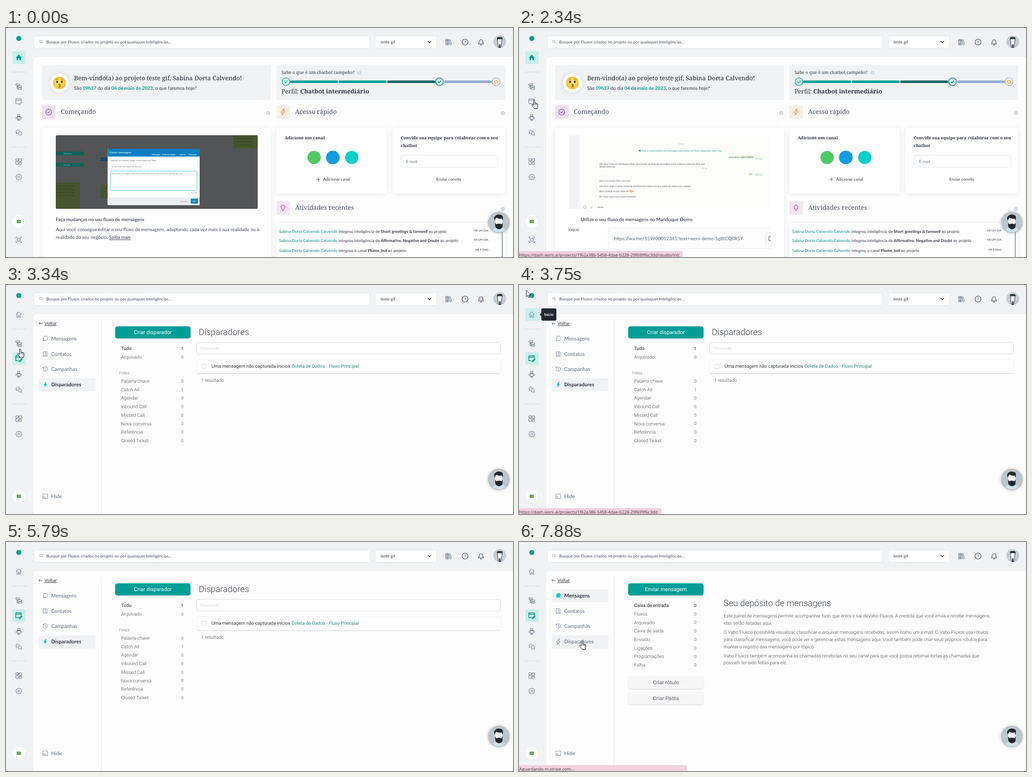
An HTML page with a canvas for the animation above (8 s loop, 1110 px wide and 504 px high).

```html
<!DOCTYPE html>
<html lang="pt-BR">
<head>
<meta charset="utf-8">
<title>Painel do projeto</title>
<style>
html, body { margin: 0; width: 100%; height: 100%; overflow: hidden; background: #f0f2f3; }
canvas { display: block; width: 1110px; height: 504px; }
</style>
</head>
<body>
<canvas id="stage"></canvas>
<script>
const W = 1110, H = 504, LOOP = 8000;
const canvas = document.getElementById('stage');
const c = canvas.getContext('2d');
const dpr = window.devicePixelRatio || 1;
canvas.width = W * dpr;
canvas.height = H * dpr;
c.textRendering = 'geometricPrecision';

const LATO = 'Lato, sans-serif', SERIF = '"Noto Serif", serif';
const ROBOTO = 'Roboto, sans-serif', OPEN = '"Open Sans", sans-serif';
const TEAL = '#009e96', MINT = '#c9efec', GRAY = '#67738b', INK = '#30353f', BODY = '#454c5a', PALE = '#f0f2f3';
const USER = 'Sabina Dorta Calvendo';
const BASE = 'https://dash.weni.ai/projects/1f62a386-5458-4dae-b228-29f699f6c3dd';

// ---- drawing helpers ----
function box(x, y, w, h, fill, r = 0, stroke, lw = 1) {
  c.beginPath();
  c.roundRect(x, y, w, h, r);
  if (fill) { c.fillStyle = fill; c.fill(); }
  if (stroke) { c.strokeStyle = stroke; c.lineWidth = lw; c.stroke(); }
}
function shadowed(blur, offset, color, draw) {
  c.save();
  c.shadowColor = color;
  c.shadowBlur = blur * dpr;
  c.shadowOffsetY = offset * dpr;
  draw();
  c.restore();
}
function card(x, y, w, h) {
  shadowed(12, 2, 'rgba(40,60,90,.10)', () => box(x, y, w, h, '#fff', 4));
}
function dot(x, y, r, fill, stroke, lw = 1) {
  c.beginPath();
  c.arc(x, y, r, 0, 7);
  if (fill) { c.fillStyle = fill; c.fill(); }
  if (stroke) { c.strokeStyle = stroke; c.lineWidth = lw; c.stroke(); }
}
function shape(d, x, y, stroke, fill, lw = 1) {
  c.save();
  c.translate(x, y);
  c.lineJoin = c.lineCap = 'round';
  const p = new Path2D(d);
  if (fill) { c.fillStyle = fill; c.fill(p); }
  if (stroke) { c.strokeStyle = stroke; c.lineWidth = lw; c.stroke(p); }
  c.restore();
}
// y is the middle of the capitals
function text(s, x, y, size, color = INK, font = LATO, weight = 400, align = 'left') {
  c.font = `${weight} ${size}px ${font}`;
  c.fillStyle = color;
  c.textAlign = align;
  c.fillText(s, x, y + size * .35);
  return c.measureText(s).width;
}
function runs(parts, x, y, size, font = LATO) {
  for (const [s, color, weight] of parts) x += text(s, x, y, size, color, font, weight);
}
function clip(x, y, w, h, r, draw) {
  c.save();
  c.beginPath();
  c.roundRect(x, y, w, h, r);
  c.clip();
  draw();
  c.restore();
}

// ---- icons ----
const ICON = {
  home: 'M-6 0L0-6 6 0M-4-1.5V6h3V2h2v4h3V-1.5',
  homeFull: 'M-6.5 .5L0-6.5 6.5 .5H4.5V6H1.5V2h-3v4h-3V.5z',
  flow: 'M-6-6h8v3h-8zM-2-1.5h8v3h-8zM-1 3h7v3h-7zM-4-3v3h2M-4 0v4.5h3',
  studio: 'M5.5-1v-5h-12v10.5h6M-6.5-3h12M1 5.5l5-5 1.2 1.2-5 5h-1.2z',
  robot: 'M-2.5-6.5h5v4h-5zM-1-4.5h.1M1-4.5h.1M-6 3v-3q0-1.5 1.500-1.500h9q1.500 0 1.500 1.500v3M-3.500-1.500v5h7v-5M-2 3.500V6.500h1.500V3.500M2 3.500V6.500H.5',
  chats: 'M1.5-2.5a3.800 3.800 0 1 0-5 4.300l-2.500.2 1-2M6 2a3.700 3.700 0 1 0-3.500 3.700H6.500L5.500 4z',
  grid: 'M-6-6h5v4h-5zM-6 0h5v6h-5zM1-6h5v6h-5zM1 2h5v4h-5z',
  full: 'M-6-3v-3h3M6-3v-3h-3M-6 3v3h3M6 3v3h-3M-3-3h6v6h-6z',
  check: 'M-3 0l2 2.3 4-4.3',
  bolt: 'M1-6.5L-4 1h3l-1 5.5L4-1H.8L2.5-6.5z',
  bubble: 'M-4.5 4.5l.6-2.5a5 5 0 1 1 2 1.9z',
  person: 'M-4-5h8v10h-8zM-2.500 3q2.500-3 5 0M0-3a1.500 1.500 0 1 0 .1 0',
  clock: 'M-4.5-2.5a5 5 0 1 1-.3 4M-4.8-4.5v2.5h2.5M0-2.5v3l2 1',
  hide: 'M-1-5h6v10h-5M-5-1v-4h2M-5 1h4v4h-4z',
  hand: 'M-1.500 1.300a1.500 1.500 0 0 1 3 0V7l4.800 1q2 .5 2 2.500v3q0 2-1.500 6H.300q-.800-2.500-3.300-5l-2.300-3.200q-.2-1.800 1.600-1.300l2.200 2z',
  arrow: 'M0 0V13.5l3.2-2.8 2 4.8 2.2-1-2-4.6H9.5z'
};
function icon(name, x, y, color = GRAY, lw = 1) { shape(ICON[name], x, y, color, null, lw); }

function radial(x, y, n, radius) {
  c.beginPath();
  for (let i = 0; i < n; i++) {
    const a = i / n * 2 * Math.PI - Math.PI / 2, r = radius(i);
    c.lineTo(x + r * Math.cos(a), y + r * Math.sin(a));
  }
  c.closePath();
}
function gear(x, y) {
  radial(x, y, 32, i => i % 4 < 2 ? 6.7 : 5.2);
  c.strokeStyle = GRAY;
  c.lineWidth = 1;
  c.stroke();
  dot(x, y, 2.2, null, GRAY);
}
function info(x, y) {
  dot(x, y, 4.6, '#d3d8df');
  text('i', x, y, 6, '#fff', LATO, 700, 'center');
}
function flag(y) {
  dot(28, y, 14, '#fff');
  box(23.5, y - 3.5, 9, 7, '#2f9b45', 1);
  shape('M-3.5 0L0-2.5 3.5 0 0 2.5z', 28, y, null, '#f5d431');
  dot(28, y, 1.2, '#28479c');
}
function bearded() {
  shadowed(6, 0, 'rgba(0,0,0,.3)', () => dot(1079, 428, 23, '#a9b4bd'));
  clip(1057, 406, 44, 44, 22, () => {
    box(1057, 406, 44, 44, '#bcc6ce');
    shape('M-15 24q0-10 9-11h13q9 1 9 11z', 1079, 427, null, '#c9e2f0');
    shape('M-8-9H8V7q-2 8-8 8T-8 7z', 1079, 427, null, '#f7f8f8');
    shape('M-9-3q-3-8 1-10 4-5 11-3 6 1 6 6 0 4-1 7l-2-5q-6 2-12-2-1 3-3 7z', 1079, 427, null, '#23272d');
    shape('M-8 1l2 4q6-3 12 0l2-4q1 8-1 12-7 6-13 0-3-4-2-12z', 1079, 427, null, '#23272d');
  });
}

// ---- shared frame ----
function side(home, hoverY) {
  dot(28, 23, 5.5, TEAL);
  if (hoverY) box(14, hoverY - 14, 29, 28, MINT, 2);
  if (home) {
    box(14, 51, 29, 28, MINT, 2);
    shape(ICON.homeFull, 28, 65, null, TEAL);
  } else {
    icon('home', 28, 65);
    box(14, 148, 29, 28, MINT, 2);
  }
  box(13, 96.5, 32, 1, '#d3d8e0');
  box(13, 261.5, 32, 1, '#d3d8e0');
  icon('flow', 28, 129);
  icon('studio', 28, 162, home ? GRAY : '#008b84', home ? 1 : 1.5);
  icon('robot', 28, 197);
  icon('chats', 28, 230);
  icon('grid', 28, 294);
  gear(28, 328);
  flag(home ? 426 : 465);
  if (home) icon('full', 28, 466);
}
function header() {
  box(62, 17.5, 734, 27, '#fff', 3, '#e4e8ee');
  dot(76.5, 29.5, 2.6, null, GRAY, .8);
  shape('M0 0l2 2', 78.5, 31.5, GRAY, null, .8);
  text('Busque por Fluxos criados no projeto ou por quaisquer Inteligências...', 88, 31, 9.05, BODY);
  box(808.5, 17.5, 134, 27, '#fff', 3, '#e4e8ee');
  text('teste gif', 820, 31, 9);
  shape('M-3-1.5l3 3 3-3', 927, 31, INK, null, 1.5);
  shape('M-5-6h3V6h-3zM-2-6h3V6h-3zM2-4.5l2.5-.7L7 5.3l-2.5.7zM-5 3h6M-5-3h6', 968, 31, GRAY);
  dot(1005, 31, 6.5, null, INK, 1.1);
  text('?', 1005, 31, 9, INK, LATO, 400, 'center');
  shape('M-5.5 4q1.5-2 1.5-5a4 4 0 0 1 8 0q0 3 1.5 5zM-1.5 6q1.5 1 3 0', 1040, 31, INK, null, 1.1);
  clip(1067, 16, 28, 28, 14, () => {
    box(1067, 16, 28, 28, '#c3cdd7');
    box(1075, 20, 12, 7, '#2b3038', 3);
    shape('M-5-4H5L3 14h-6z', 1081, 28, '#2b3038', '#fff', 1);
    box(1079.5, 36, 3, 8, '#2b3038');
  });
}

// ---- carousel slides ----
function caption(x, title, first, second) {
  text(title, x, 421, 10.35, INK, LATO, 500);
  if (!first) return;
  text(first, x, 443, 10.3, BODY);
  const from = x + text(second + ' ', x, 460, 10.3, BODY);
  const w = text('Saiba mais', from, 460, 10.3, INK);
  box(from, 465.5, w, 1, INK);
}
function slideEdit(t) {
  clip(109, 236, 442, 162, 3, () => {
    box(109, 236, 442, 162, '#525455');
    box(497, 236, 54, 29, '#47552f');
    box(109, 340, 53, 58, '#47552f');
    box(207, 345, 16, 30, '#47552f');
    box(109, 272, 61, 8, '#0b625c');
    box(109, 297, 61, 8, '#0b625c');
    box(207, 285, 16, 8, '#174568');
    for (let i = 0; i < 4; i++) text('mensagem do fluxo', 111, 347 + i * 7, 4.5, '#2f381d');
    for (let i = 0; i < 3; i++) text('resposta do contato', 501, 243 + i * 7, 4.5, '#2f381d');
    text('Resposta', 126, 276, 4.5, '#9fb5b2');
    text('Divisão', 126, 301, 4.5, '#9fb5b2');
    shape('M40 0V14H-60M205 0v17', 276, 236, '#38586b');
    shape('M0 0v9h50M0 25v14', 138, 281, '#38586b');
  });
  box(222.5, 266, 201.5, 124, '#fff', 2);
  box(222.5, 266, 201.5, 17, '#0a7fc1', [2, 2, 0, 0]);
  text('Enviar mensagem', 227, 273.5, 6.2, '#fff');
  ['Mensagem', 'Resposta Rápida', 'Anexos', 'Avançado'].forEach((s, i) =>
    text(s, [319, 342, 380, 400][i], 279, 4, '#fff', LATO, 700));
  text('Quando um contato chegar a esse ponto do fluxo,', 229, 291, 4.6, '#666');
  box(229, 299.5, 189, 11, '#fff', 1, '#eceff2', .7);
  text('Enviar uma mensagem ao contato', 232, 305, 4.4, '#888');
  shape('M-1.5-1l1.5 1.5 1.5-1.5', 412, 305, '#888', null, .6);
  box(229, 315, 189, 43, '#fff', 1, '#4dbfe0', 1);
  if (t > 1100) box(338, 318, 31, 6.5, '#3d86d6');
  text('Esta é uma mensagem e precisamos desta informação para testar em canal ou por você.', 231.5, 321, 4.1, '#777');
  text('80/640', 405, 363, 4, '#888');
  box(222.5, 373, 201.5, 17, '#eceef0', [0, 0, 2, 2]);
  text('Cancelar', 381, 381, 4.3, '#777');
  box(404.5, 375.5, 15.5, 11, '#1488c6', 1);
  text('Ok', 412, 381, 4.5, '#fff', LATO, 400, 'center');
  caption(109, 'Faça mudanças no seu fluxo de mensagens',
    'Aqui você consegue editar o seu fluxo de mensagens, adaptando cada vez mais à sua realidade ou à',
    'realidade do seu negócio.');
}
function slideChat() {
  box(109, 236, 442, 162, '#fcfcfb', 3);
  box(109, 236, 24, 162, '#f4f4f6');
  for (let y = 240; y < 396; y += 5) box(112, y, 18, .7, '#e8eaed');
  const line = (s, x, y, color = '#4d5157') => text(s, x, y, 4.9, color);
  line('HOJE', 349, 255, '#b4b8bd');
  box(259, 266, 188, 8, '#f3fbf8', 2);
  dot(264.5, 270, 2, '#2f9d8d');
  line('Este é o seu trabalho com mensagens para testar seu fluxo. Clique para saber mais', 269, 270, '#2f9d8d');
  box(456, 280, 79, 9, '#f4fbea', 2);
  line('weni-demo-5gBtCQ0RSY', 459, 284.5);
  line('09:38 ✓', 518, 288, '#9ab');
  line('Olá, bem-vindo ao Mandoque Demo, para iniciar um fluxo de mensagens envie a palavra-chave do fluxo que', 176, 299);
  line('deseja testar ••', 176, 305.5);
  line('09:38', 399, 309, '#b4b8bd');
  box(501, 317, 34, 8, '#f4fbea', 2);
  line('Oi', 504, 321);
  line('09:38 ✓', 518, 323, '#9ab');
  ['Que é um prazer falar com você', 'Seja bem-vindo à nossa central de atendimento! Vamos iniciar a coleta de dados para cadastro',
    'Bem-vindo(a) ao meu teste de fluxo', 'Por favor, qual o seu nome completo?'].forEach((s, i) => line(s, 176, 336.5 + i * 11.6));
  dot(246, 359.5, 2.5, '#f5c842');
  dot(144, 394, 3, null, '#999', .8);
  shape('M-2 2l4-4M0 3l3-3', 158, 394, '#999', null, .8);
  line('Nome', 172, 394);
  caption(135, 'Utilize o seu fluxo de mensagens no Mandoque Demo');
  clip(108, 432, 443, 60, 0, () => {
    text('Mandoque', 132, 443, 10.3, BODY, LATO, 400, 'right');
    box(195.5, 440.5, 370, 45, '#fefefe', 3, '#e6e9ee');
    text('https://wa.me/559900012345?text=weni-demo-5gBtCQ0RSY', 208, 463, 10.3, '#5c6675');
    box(540.5, 450.5, 30, 25, '#fff', 3, '#dfe3ea');
    box(547, 459, 8, 9, null, 1, INK);
  });
}
function note(x, y, w, h, lines) {
  box(x, y, w, h, '#c8ef86');
  box(x, y, w, 8, '#b9e470');
  text('Mensagem do fluxo', x + 3, y + 4.5, 4.4, '#55682f', LATO, 700);
  for (let i = 0; i < lines; i++)
    text(['Esta parte do fluxo é a', 'resposta que o contato', 'recebe com mensagem', 'e o grupo é salvo aqui'][i % 4], x + 3, y + 13 + i * 6, 4.3, '#64783a');
}
function slideFlow() {
  box(109, 236, 441, 162, '#f8f9fa');
  c.fillStyle = '#e9ecf0';
  for (let x = 112; x < 549; x += 6) for (let y = 239; y < 397; y += 6) c.fillRect(x, y, 1, 1);
  shape('M24 0v10H0v9M0 46v52M-2 95l2 4 2-4M-2 17l2 3 2-3', 268, 236, '#79aecb');
  const step = (y, h, color, title) => {
    box(237, y, 63, h, '#fff', 2, '#e8ebef', .7);
    box(237, y, 63, 9, color, [2, 2, 0, 0]);
    text(title, 268.5, y + 4.5, 5, '#fff', LATO, 700, 'center');
  };
  step(257, 25, '#3c3096', 'Adicionar a um Grupo');
  text('Fluxo Completo', 240, 273, 4.6, '#666');
  step(339, 26, '#0a80bd', 'Enviar mensagem');
  text('Obrigado! Seus dados,', 240, 354, 4.5, '#666');
  text('aguarde o atendente.', 240, 360, 4.5, '#666');
  dot(278, 360, 2, '#e6b23c');
  dot(268, 368, 2, '#e4534d');
  note(319, 257, 56, 101, 15);
  note(167, 346, 56, 41, 5);
  shape('M0 0v5l1.5-1 1 2', 478, 335, '#777', null, .8);
  caption(108, 'Conheça o projeto que preparamos para você!',
    'Esta opção oferece o fluxo de coleta de dados, aqui você já tem seu projeto integrado ao Mandoque',
    'Demo e redirecionamento para atendimento humano.');
}

// ---- pages ----
function emoji(x, y) {
  shadowed(8, 0, 'rgba(40,60,90,.14)', () => dot(x, y, 21, '#fff'));
  const g = c.createRadialGradient(x, y - 3, 3, x, y, 14);
  g.addColorStop(0, '#ffe46b');
  g.addColorStop(1, '#f9bf3b');
  dot(x, y, 14, g);
  for (const s of [-1, 1]) {
    c.beginPath();
    c.ellipse(x + s * 5, y - 2.5, 2, 2.8, 0, 0, 7);
    c.fillStyle = '#5b3513';
    c.fill();
    shape('M-2.5 1q2.5-2.5 5 0', x + s * 5.5, y - 8.5, '#8b5a1c', null, 1);
  }
  shape('M-1.5-3q4 0 3 2-1 1-2 1 3 0 2 2-1 1.5-3 1', x, y + 6, '#7a3e13', null, 1.3);
}
function progress() {
  const y = 118.2;
  [[622, TEAL], [728.5, TEAL], [834.5, '#00665f'], [959, '#93aad0']].forEach(([x, col]) =>
    box(x, y - 2.8, 105, 5.6, col, 2.5));
  dot(613, y, 8.5, MINT, TEAL, 1.2);
  icon('check', 613, y, TEAL, 1.2);
  dot(949, y, 8.5, MINT, '#00665f', 1.2);
  icon('check', 949, y, '#00665f', 1.2);
  dot(1073, y, 8.5, '#fff', '#93aad0', 1.2);
  radial(1073, y + .4, 10, i => i % 2 ? 2.3 : 5);
  c.strokeStyle = '#eaa62b';
  c.stroke();
}
function heading(x, y, tile, title) {
  box(x, y - 15, 29.5, 30, tile, 2);
  text(title, x + 41, y - 1, 13.8, '#454b59', SERIF);
}
function activity(y, mid, bold, end, when) {
  runs([[USER + ' Calvendo', '#008b84', 400], [mid, INK, 400], [bold, INK, 700], [end, INK, 400]], 598, y, 8.85);
  text(when, 1056, y - 2, 6, INK, LATO, 400, 'right');
}
function homePage(t) {
  box(79, 82, 501, 76, PALE, 4);
  emoji(117, 121);
  text(`Bem-vindo(a) ao projeto teste gif, ${USER}!`, 149, 110, 13.5, '#1f2329', SERIF);
  runs([['São ', INK, 400], ['09h37', TEAL, 700], [' do dia ', INK, 400], ['04 de maio de 2023', TEAL, 700],
    [', o que faremos hoje?', INK, 400]], 149, 132, 10.3);
  box(592, 82, 501, 76, PALE, 4);
  text('Sabe o que é um chatbot campeão?', 603, 98, 9.65, INK, SERIF, 500);
  info(774, 98.5);
  progress();
  runs([['Perfil: ', INK, 400], ['Chatbot intermediário', INK, 700]], 603, 139, 13.2, SERIF);

  heading(79, 185, '#ece1f5', 'Começando');
  dot(93.5, 185, 6.5, null, '#8a2bb0', 1.1);
  icon('check', 93.5, 185, '#8a2bb0', 1.1);
  heading(592, 185, '#fdeee4', 'Acesso rápido');
  icon('bolt', 606.5, 185, '#ee7b2b', 1.1);
  info(574, 187);
  info(1088, 187);

  card(79, 220, 501, 300);
  if (t < 2000) slideEdit(t);
  else if (t < 2560) slideChat();
  else slideFlow();

  card(592, 220, 241, 144);
  text('Adicione um canal', 610, 242, 9.4, INK, SERIF, 600);
  dot(674.5, 285, 14.5, '#50c962');
  dot(715.5, 285, 15, '#159be0');
  dot(757, 285, 14.5, '#0ccfca');
  shape('M-4 0h8M0-4v8', 684, 333, INK, null, .8);
  text('Adicionar canal', 694, 333, 8.9);
  card(846, 220, 247, 144);
  text('Convide sua equipe para colaborar com o seu', 864, 242, 9.3, INK, SERIF, 600);
  text('chatbot', 864, 259, 9.3, INK, SERIF, 600);
  box(864.5, 280.5, 212, 26, '#fff', 3, '#e2e6ed');
  text('E-mail', 876, 293.5, 8.9, '#67738b');
  text('Enviar convite', 969.5, 333, 8.9, INK, LATO, 400, 'center');

  heading(592, 396, '#f8e5f6', 'Atividades recentes');
  shape('M-2 3q0-1.5-1.5-3a4 4 0 1 1 7 0Q2 1.5 2 3zM-1.5 5.5h3M0-7.5v.5M-6-2h.5M5.5-2h.5', 606.5, 396, '#c13bb4', null, 1.1);
  info(1088, 398);
  card(592, 429, 501, 100);
  activity(447.5, ' integrou inteligência de ', 'Short greetings & farewell', ' ao projeto', 'HÁ UM DIA');
  activity(468, ' integrou inteligência de ', 'Affirmative, Negative and Doubt', ' ao projeto', 'HÁ UM DIA');
  activity(489.5, ' integrou o canal ', 'Plume_bot', ' ao projeto', 'HÁ 8 DIAS');
  box(1085.5, 445, 2, 59, '#8d949f', 1);
}

const MENU = [['Mensagens', 'bubble', 118], ['Contatos', 'person', 152], ['Campanhas', 'clock', 185], ['Disparadores', 'bolt', 219.5]];
function menu(active, p) {
  shape('M8 0H0M2.5-2L0 0l2.5 2', 72, 84.5, INK, null, .8);
  const w = text('Voltar', 84, 84, 10.3);
  box(84, 89, w, 1, INK);
  for (const [name, sign, y] of MENU) {
    const on = name === active;
    const over = p && p.x > 72 && p.x < 196 && Math.abs(p.y - y) < 14.5;
    if (on || over) box(72, y - 14, 124, 28.5, '#f1f2f4', 2);
    if (on) shape(ICON[sign], 86, y, null, '#00cfc6');
    else icon(sign, 86, y, GRAY, .9);
    text(name, 99, y, 11.2, on ? INK : '#5f6979', LATO, on ? 700 : 400);
  }
  icon('hide', 86, 465, GRAY, .9);
  text('Hide', 99, 465, 11.2, '#5f6979');
  box(208, 77, 1, 427, '#e3e6eb');
}
function button(label, y, h, fill, color) {
  shadowed(2, 1, 'rgba(0,0,0,.18)', () => box(239, y, 165, h, fill, 5));
  text(label, 321.5, y + h / 2 - .3, 11.55, color, ROBOTO, 400, 'center');
}
function rows(names, y, counts, strong) {
  names.forEach((s, i) => {
    const col = strong && !i ? '#1d1f22' : '#3e4146';
    const weight = strong && !i ? 400 : 300;
    text(s, 252, y + i * 18.7, 10.2, col, ROBOTO, weight);
    text(counts[i], 388.5, y + i * 18.7, 9.6, col, ROBOTO, weight, 'right');
  });
}
function triggersPage() {
  button('Criar disparador', 91, 26.5, TEAL, '#fff');
  rows(['Tudo', 'Arquivado'], 139.7, '10', true);
  text('TYPES', 247, 194.5, 7.7, '#7d8288', ROBOTO);
  rows(['Palavra-chave', 'Catch All', 'Agendar', 'Inbound Call', 'Missed Call', 'Nova conversa', 'Referência', 'Closed Ticket'], 211.5, '01000000');
  text('Disparadores', 422, 103, 19, '#3b3e43', ROBOTO, 300);
  box(417.5, 126.5, 665, 25.5, '#fff', 5, '#d9dde4');
  text('Pesquisar', 425, 139, 9.3, '#c3c7cd', ROBOTO, 300);
  box(417.5, 164, 665, 31, '#fff', 4, '#eeeff2');
  box(419, 194.5, 662, 1, '#cfd3d8');
  box(428.5, 174.5, 10, 9, '#fff', 2, '#d3d8e0');
  runs([['Uma mensagem não capturada inicios ', '#2f3237', 400], ['Coleta de Dados - Fluxo Principal', '#2b8377', 400]], 450, 178, 10.1, ROBOTO);
  text('1 resultado', 427.5, 209, 10.1, '#3e4146', ROBOTO, 300);
}
function messagesPage() {
  button('Enviar mensagem', 91, 26.5, TEAL, '#fff');
  rows(['Caixa de entrada', 'Fluxos', 'Arquivado', 'Caixa de saída', 'Enviado', 'Ligações', 'Programações', 'Falha'], 139.7, '00000000', true);
  button('Criar rótulo', 295, 28, '#f6f6f7', '#5f6368');
  button('Criar Pasta', 330, 28, '#f6f6f7', '#5f6368');
  text('Seu depósito de mensagens', 448, 134.5, 19, '#3b3e43', ROBOTO, 300);
  [[162.5, 'Este painel de mensagens permite acompanhar tudo que entra e sai deVabo Fluxos. À medida que você envia e recebe mensagens,'],
    [178, 'elas serão listadas aqui.'],
    [198.5, 'O Vabo Fluxos possibilita visualizar, classificar e arquivar mensagens recebidas, assim como um e-mail. O Vabo Fluxos usa rótulos'],
    [214, 'para classificar mensagens, você pode ver e gerenciar estas mensagens aqui. Você também pode criar seus próprios rótulos para'],
    [230, 'manter o registro das mensagens por tópico.'],
    [250, 'Vabo Fluxos também acompanha as chamadas recebidas no seu canal para que você possa retornar todas as chamadas que'],
    [265.5, 'possam ter sido feitas para ele.']
  ].forEach(([y, s]) => text(s, 448, y, 10.2, '#3b3e43', ROBOTO, 300));
}

// ---- timeline ----
const STUDIO_AT = 3200, MESSAGES_AT = 6850;
const TIPS = [[900, 1700, 129, 'Fluxos'], [2390, 3170, 162, 'Estúdio'], [3600, 3830, 65, 'Início']];
const STATUS = [[900, 1720, BASE + '/push/init', 358], [1720, 3170, BASE + '/studio/init', 358],
  [3600, 4200, BASE, 312], [6950, LOOP, 'Aguardando m.stripe.com...', 367]];
const MOVES = [
  [[500, 240, 520], [900, 36, 150], [1180, 30, 126], [1400, 30, 132], [1630, 32, 146], [1760, 33, 156],
    [2340, 33, 158], [2790, 32, 158], [3250, 32, 158], [3590, 26, 60], [3750, 16, 12], [4000, 19, 8],
    [4250, 20, 8], [4600, 40, 2], [4790, 70, 1], [5090, 92, 4], [5340, 92, 4]],
  [[5800, 95, -20], [6150, 110, 40], [6590, 122, 113], [6950, 122, 113], [7400, 136, 210], [7600, 138, 217], [LOOP, 138, 217]]
];
function pointer(t) {
  for (const keys of MOVES) {
    for (let i = 1; i < keys.length; i++) {
      const [t0, x0, y0] = keys[i - 1], [t1, x1, y1] = keys[i];
      if (t < t0 || t >= t1) continue;
      const u = (t - t0) / (t1 - t0), e = u * u * (3 - 2 * u);
      return { x: x0 + (x1 - x0) * e, y: y0 + (y1 - y0) * e };
    }
  }
  return null;
}
const during = (list, t) => list.find(([from, to]) => t >= from && t < to);

function tooltip(y, label) {
  c.font = `700 8.6px ${LATO}`;
  const w = c.measureText(label).width + 12;
  shape('M0 0l4-4v8z', 45.5, y, null, '#22262f');
  box(49, y - 13.5, w, 27, '#22262f', 3);
  text(label, 55, y, 8.6, '#fff', LATO, 700);
}
function drawPointer({ x, y }) {
  const onSide = x > 13 && x < 44 && (y > 50 && y < 80 || y > 114 && y < 240);
  const onMenu = x > 72 && x < 196 && y > 104 && y < 234;
  shape(onSide || onMenu ? ICON.hand : ICON.arrow, x, y, '#111', '#fff', 1);
  if (onSide || onMenu) shape('M1.5 7v4M4 8v3.5M6.3 9v3', x, y, '#111', null, .8);
}
function draw(t) {
  c.setTransform(dpr, 0, 0, dpr, 0, 0);
  box(0, 0, W, H, PALE);
  const home = t < STUDIO_AT, p = pointer(t), tip = during(TIPS, t), status = during(STATUS, t);
  box(60, 64, 1060, 460, '#fdfdfd', 8);
  side(home, tip && tip[2]);
  header();
  if (home) homePage(t);
  else {
    const late = t >= MESSAGES_AT;
    menu(late ? 'Mensagens' : 'Disparadores', p);
    late ? messagesPage() : triggersPage();
  }
  bearded();
  if (tip) tooltip(tip[2], tip[3]);
  if (status) {
    box(0, 491, status[3], 13, '#f3d1df', [0, 3, 0, 0]);
    text(status[2], .5, 500, 9.3, '#43393f', OPEN);
  }
  if (p) drawPointer(p);
}

const start = performance.now();
function tick() {
  draw((performance.now() - start) % LOOP);
  requestAnimationFrame(tick);
}
tick();
</script>
</body>
</html>
```
